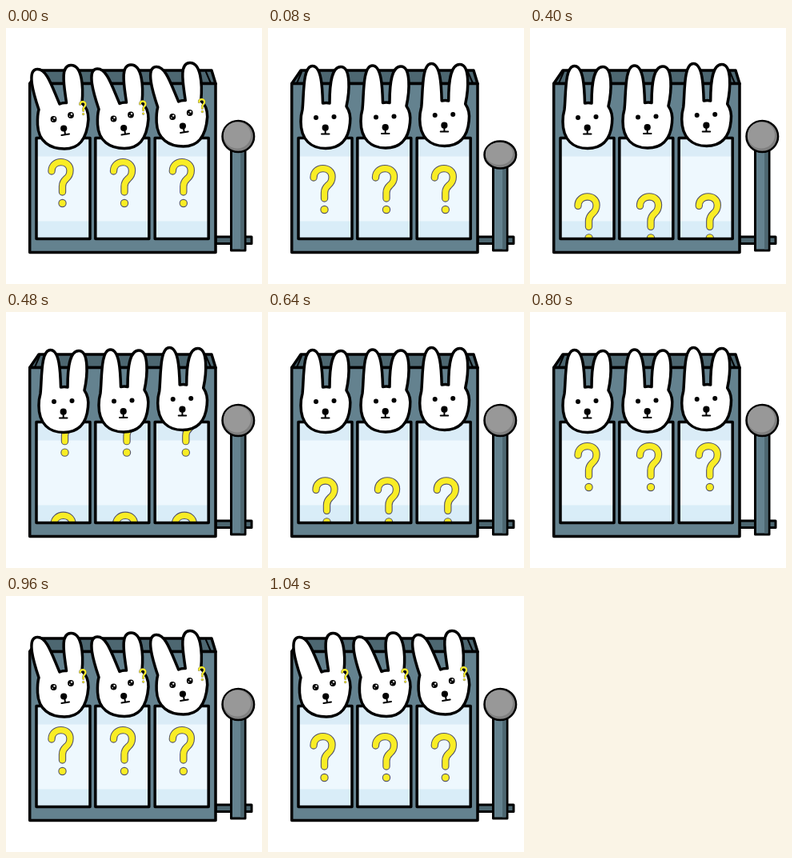
Animation, 320 px wide and 320 px high, one loop 1.36 s. Source, as an HTML page with a canvas:

```html
<!DOCTYPE html>
<html>
<head>
<meta charset="utf-8">
<style>
html, body { margin: 0; width: 100%; height: 100%; overflow: hidden; background: #fff; }
canvas { display: block; width: 320px; height: 320px; }
</style>
</head>
<body>
<canvas id="stage" width="320" height="320"></canvas>
<script>
const ctx = document.getElementById('stage').getContext('2d');
const STEP = 80, LOOP = 1360, LAST = 13, SPACING = 130;
const STEEL = '#64828f', DARK = '#4d6771', YELLOW = '#f9ed25', EDGE = '#54546a';

const hook = new Path2D('M57 187C57 172 80 172 80 186C80 198 70.5 195 70.5 206V213');
const upright = new Path2D('M43 102C45 85 43 47.5 55.5 47.5C67 47.5 68 75 68.5 94Q73 93 77 94C77 72 79 48.5 91 48.5C104 48.5 102 80 98 98C103 105 103.5 111 102.5 119C100.5 142 88 150.5 72 150.5C54 150.5 41 140 41 117Q41 109 43 102Z');
const tilted = new Path2D('M41 102C35 84 25 52 39 51.5C51 51 57 72 67 95Q71 93 75.5 93.5C73 74 67 47 81 46.5C95 46 97 73 95 94C101 99 103 105 103 114C101 141 90 151 73 151C55 151 40.5 142 39.5 121Q39 109 41 102Z');

function shape(path, fill, width = 3.5) {
  ctx.fillStyle = fill;
  ctx.strokeStyle = '#000';
  ctx.lineWidth = width;
  ctx.fill(path);
  if (width) ctx.stroke(path);
}

function box(x, y, w, h, fill, width = 3) {
  const path = new Path2D();
  path.rect(x, y, w, h);
  shape(path, fill, width);
}

function oval(x, y, rx, ry, fill, width = 0) {
  const path = new Path2D();
  path.ellipse(x, y, rx, ry, 0, 0, 7);
  shape(path, fill, width);
}

function at(x, y, draw, scale = 1) {
  ctx.save();
  ctx.translate(x, y);
  ctx.scale(scale, scale);
  draw();
  ctx.restore();
}

function question() {
  for (const [color, width, r] of [[EDGE, 9.4, 5.2], [YELLOW, 7.2, 4.1]]) {
    ctx.strokeStyle = color;
    ctx.lineWidth = width;
    ctx.stroke(hook);
    oval(70.5, 227, r, r, color);
  }
}

function bunny(happy) {
  shape(happy ? tilted : upright, '#fff');
  const eyes = happy ? [[59.5, 114], [81, 109]] : [[60, 112], [82.5, 111]];
  for (const [x, y] of eyes) {
    const r = happy ? 3.9 : 3;
    oval(x, y, r, r, '#000');
    if (happy) {
      oval(x + 1, y - 1.4, 1.2, 1.2, '#fff');
      oval(x - 1.3, y + 1.3, .7, .7, '#fff');
    }
  }
  const [nx, ny] = happy ? [72.2, 125.5] : [71.7, 124.7];
  oval(nx, ny, 4.1, 4.1, '#000');
  ctx.strokeStyle = '#000';
  ctx.lineWidth = 2;
  ctx.stroke(new Path2D(happy ? 'M73 126L74 133M69.5 134L79 132.5' : 'M71.7 125V132.5M67 132.5H76.5'));
  if (happy) at(75.5, 39.5, question, .3);
}

function reel(x, shift, dx) {
  const y = 137.5, w = 67, h = 126;
  ctx.save();
  ctx.beginPath();
  ctx.rect(x, y, w, h);
  ctx.clip();
  box(x, y, w, h, '#eef8fe', 0);
  box(x, y, w, 23, '#daecf7', 0);
  box(x, 241.5, w, 22, '#d9edf8', 0);
  for (const dy of [shift, shift - SPACING]) at(dx, dy, question);
  ctx.restore();
  ctx.strokeStyle = '#000';
  ctx.lineWidth = 3.5;
  ctx.strokeRect(x, y, w, h);
}

function lever(drop) {
  box(262, 261, 45, 8.5, DARK);
  const top = 148 + drop * 1.1;
  box(281.5, top, 17.5, 278 - top, STEEL);
  box(293, top + 1.5, 4.5, 275 - top, DARK, 0);
  const y = 135.5 + drop, ry = drop ? 17 : 19.5;
  oval(290.3, y, 19.8, ry, '#808080', 2.5);
  oval(289, y - 1.5, 17, ry - 3, '#989898');
}

function machine() {
  shape(new Path2D('M29.7 69.5L41 53H257L262 69.5Z'), DARK);
  box(29.7, 69.5, 232.3, 211, STEEL, 3.5);
  ctx.lineWidth = 2;
  ctx.stroke(new Path2D('M42 55L36 69M250 55L256 69'));
}

const spinning = n => n > 3 && n < 11;

// Reels advance a third of the symbol spacing per step, then bob at rest.
function reelShift(n) {
  if (spinning(n)) return -8 + (n - 4) % 3 * SPACING / 3;
  return n === 0 || n === 12 ? -8 : 0;
}

function draw(n) {
  const happy = n === 0 || n >= 11;
  const sway = spinning(n) ? 3 : 0;
  ctx.fillStyle = '#fff';
  ctx.fillRect(0, 0, 320, 320);
  lever([0, 23, 50][n] || 0);
  machine();
  const shift = (reelShift(n) + SPACING) % SPACING;
  [[38, 0], [111.8, 77.5], [186.2, 151.3]].forEach(([x, dx]) => reel(x, shift, dx + sway));
  [[0, 0], [75, -.5], [148.7, -3]].forEach(([x, y]) => at(x, y, () => bunny(happy)));
}

ctx.lineCap = ctx.lineJoin = 'round';
function tick() {
  draw(Math.min(LAST, Math.floor(performance.now() % LOOP / STEP)));
  requestAnimationFrame(tick);
}
tick();
</script>
</body>
</html>
```
